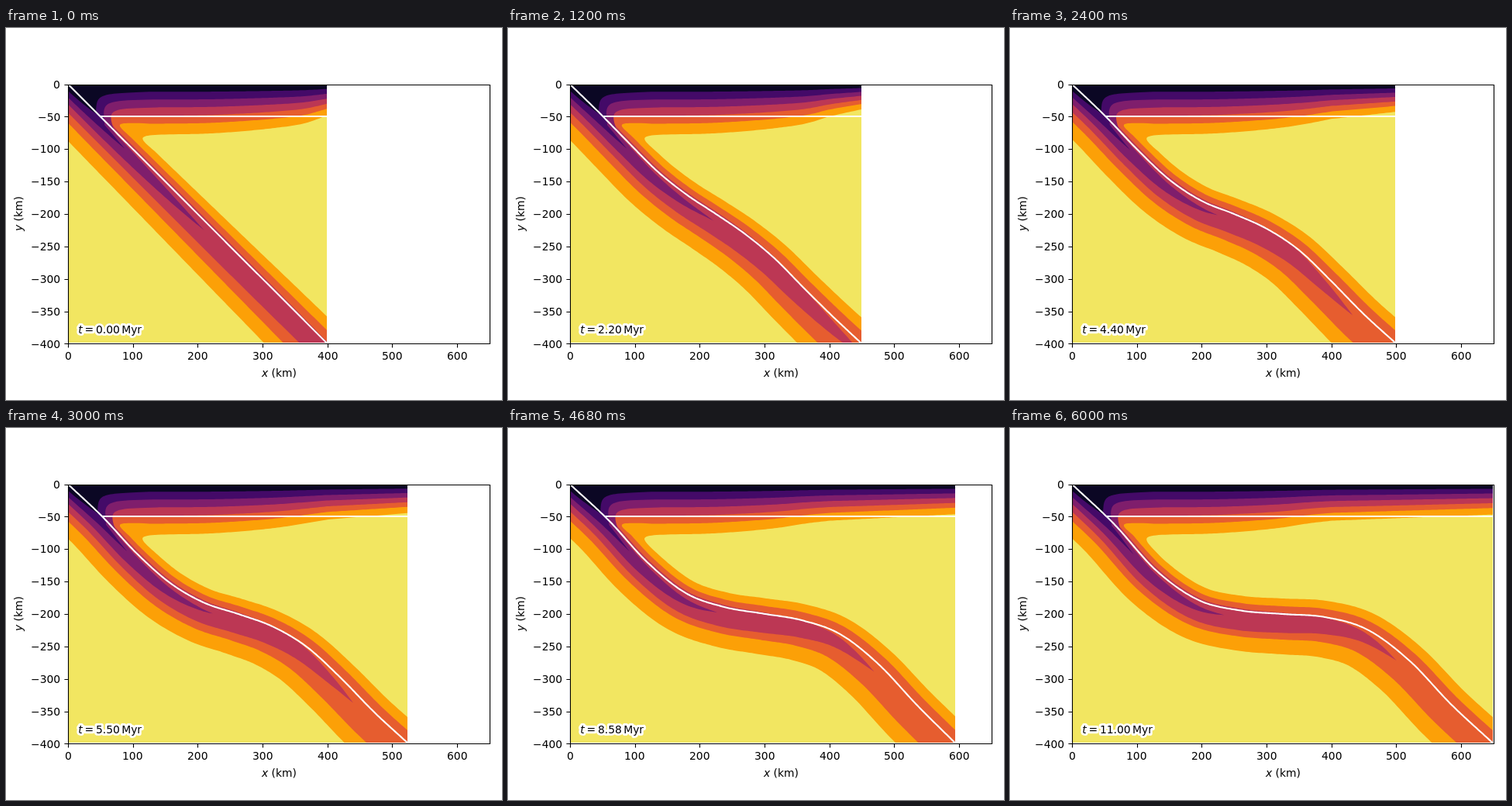
Write an HTML page with a canvas that moves like this. It is 640x480 px and loops after 6120 ms.

```html
<!DOCTYPE html>
<html lang="en">
<head>
<meta charset="utf-8">
<title>Slab temperature</title>
<style>
html, body { margin: 0; width: 100%; height: 100%; overflow: hidden; background: #fff; }
canvas { display: block; width: 640px; height: 480px; }
</style>
</head>
<body>
<canvas id="stage" width="640" height="480"></canvas>
<script>
const ctx = document.getElementById('stage').getContext('2d');
const LEFT = 80, TOP = 72.6, BOTTOM = 407.4, RIGHT = 624;
const SCALE = (RIGHT - LEFT) / 650;
const STEP_MS = 120, STEPS = 51, STEP_MYR = 0.22;
const FONT = '13.89px "DejaVu Sans", sans-serif';

// Poses of the slab: depth at tenths of the domain width, for each key time.
const KEY_TIMES = [0, 1.1, 3.3, 5.5, 7.04, 8.58, 11];
const TENTHS = [0, .1, .2, .3, .4, .5, .6, .7, .8, .9, 1];
const SLAB_Y = [
  [106, 139.6, 173, 206.5, 240, 273.5, 307, 340.4, 373.9],
  [107.5, 144, 179, 210, 240, 270, 303, 338.5, 373],
  [111, 151.5, 191, 220, 240, 262, 291, 331, 371],
  [114, 161, 200, 225.5, 240, 256, 282, 322, 367],
  [116, 167, 207, 228.5, 239.5, 251, 271, 312, 361],
  [119, 173, 213, 231, 239.5, 248, 266, 305, 358],
  [124, 184, 222, 235.5, 240, 244, 260, 300, 357]
].map(row => [TOP, ...row, BOTTOM]);

// Depth of the hottest plate isotherm.
const PLATE_X = [150, 250, 300, 350, 385, 414.8];
const PLATE_DEPTH = [65, 64, 61, 56, 50.5];
const DEPTH_OLD_EDGE = [40, 39.5, 43.5, 45.5, 46.5, 47, 47];
const DEPTH_NEW_EDGE = [40, 32, 34, 37, 38, 38.5, 39];

// Isotherms, hot to cold. below/above: normal distances from the slab surface,
// join: where the mantle corner leaves the slab, nose: its control point.
const LEVELS = [
  { color: '#fca007', ratio: 1, below: [51, 58, 53], above: [15, 25], join: 179, nose: [167, 138], plate: 230 },
  { color: '#e65d2f', ratio: .785, below: [35, 40, 31], above: [8, 12], join: 152, nose: [140, 122], plate: 185 },
  { color: '#bc3754', ratio: .625, below: [26], above: [3], join: 138, nose: [128, 113], plate: 180,
    tip: [600, 510, 453, 456, 467, 480, 506], tipDepth: 11, power: [5, 5] },
  { color: '#7f1e6c', ratio: .46, below: [18.4], above: [0], join: 142, nose: [130, 104], plate: 195,
    tip: [262, 267, 272, 270, 271, 272, 278], tipDepth: 9, power: [3, 1.5], drift: 1 },
  { color: '#440a68', ratio: .305, below: [12], above: [2], join: 130, nose: [124, 94], plate: 190,
    tip: [158, 158, 159, 161, 161, 162, 165], tipDepth: 7, power: [2, 1], drift: 1 },
  { color: '#0b0724', ratio: .15, below: [6], above: [0], join: 117, nose: [117, 85], plate: 185,
    tip: [118, 118, 119, 120, 121, 121, 122], tipDepth: 1, power: [2, 1], drift: 1 }
];

const clamp = (v, a, b) => Math.max(a, Math.min(b, v));
const lerp = (a, b, f) => a + (b - a) * f;

function spline(xs, ys, x) {
  const last = xs.length - 1;
  let i = 0;
  while (i < last - 1 && x > xs[i + 1]) i++;
  const slope = j => {
    const a = Math.max(j - 1, 0), b = Math.min(j + 1, last);
    return (ys[b] - ys[a]) / (xs[b] - xs[a]);
  };
  const h = xs[i + 1] - xs[i], f = (x - xs[i]) / h, g = 1 - f;
  return ys[i] * g * g * (1 + 2 * f) + ys[i + 1] * f * f * (3 - 2 * f)
    + h * f * g * (slope(i) * g - slope(i + 1) * f);
}

const atTime = (values, time) => spline(KEY_TIMES, values, time);

function makeScene(time) {
  const width = SCALE * (400 + 250 * time / 11);
  const edge = LEFT + width;
  const nodes = TENTHS.map((_, i) => atTime(SLAB_Y.map(row => row[i]), time));
  const slabY = x => {
    if (x < LEFT) return TOP + x - LEFT;
    if (x > edge) return BOTTOM + x - edge;
    return spline(TENTHS, nodes, (x - LEFT) / width);
  };
  const offset = (x, distance) => {
    const slope = (slabY(x + 2) - slabY(x - 2)) / 4, length = Math.hypot(1, slope);
    return [x - distance * slope / length, slabY(x) + distance / length];
  };
  const oldDepth = atTime(DEPTH_OLD_EDGE, time), newDepth = atTime(DEPTH_NEW_EDGE, time);
  const depths = [...PLATE_DEPTH, oldDepth];
  const oldEdge = PLATE_X[PLATE_X.length - 1];
  const plateDepth = x => x <= oldEdge
    ? spline(PLATE_X, depths, x)
    : lerp(oldDepth, newDepth, (x - oldEdge) / Math.max(edge - oldEdge, 1));
  return { time, width, edge, slabY, offset, plateDepth };
}

function fillLevel(level, scene) {
  const { time, width, edge, offset, plateDepth } = scene;
  const end = level.tip ? atTime(level.tip, time) : edge + 100;
  const progress = x => clamp((x - LEFT) / (level.tip ? end - LEFT : width), 0, 1);
  const below = x => {
    const f = progress(x), b = level.below;
    return level.tip
      ? lerp(b[0], level.tipDepth, f ** level.power[0])
      : lerp(b[0], lerp(b[1], b[2], time / 11), f);
  };
  const above = x => {
    const f = progress(x), a = level.above;
    return level.tip
      ? lerp(-a[0], level.tipDepth, f ** level.power[1])
      : -lerp(a[0], a[1], f);
  };
  const plateY = x => TOP + level.ratio * plateDepth(x);
  const drift = (level.drift || 0) * 4 * time / 11;
  const join = Math.min(level.join + drift, end);
  const noseX = level.nose[0] + drift, noseY = level.nose[1];

  ctx.beginPath();
  ctx.moveTo(0, TOP);
  for (let x = 10; x < end; x += 3) ctx.lineTo(...offset(x, below(x)));
  for (let x = end; x > join; x -= 3) ctx.lineTo(...offset(x, above(x)));
  ctx.lineTo(...offset(join, above(join)));
  ctx.bezierCurveTo(noseX, noseY, noseX, noseY, level.plate, plateY(level.plate));
  for (let x = level.plate + 3; x < edge; x += 3) ctx.lineTo(x, plateY(x));
  ctx.lineTo(edge, plateY(edge));
  ctx.lineTo(edge, TOP);
  ctx.closePath();
  ctx.fillStyle = level.color;
  ctx.fill();
}

function drawField(scene) {
  const { edge, slabY } = scene;
  ctx.save();
  ctx.beginPath();
  ctx.rect(LEFT, 73, Math.round(edge) - 1 - LEFT, 333);
  ctx.clip();
  ctx.fillStyle = '#f2e661';
  ctx.fillRect(LEFT, 73, edge - LEFT, 334);
  for (const level of LEVELS) fillLevel(level, scene);

  ctx.beginPath();
  ctx.moveTo(LEFT, TOP);
  for (let x = LEFT + 2; x < edge; x += 2) ctx.lineTo(x, slabY(x));
  ctx.lineTo(edge, BOTTOM);
  const plateBase = Math.round(TOP + 50 * SCALE);
  let corner = LEFT;
  while (slabY(corner) < plateBase) corner += .25;
  ctx.moveTo(corner, plateBase);
  ctx.lineTo(edge, plateBase);
  ctx.strokeStyle = '#fff';
  ctx.lineWidth = 2.08;
  ctx.stroke();
  ctx.restore();
}

// Draws [text, italic, gap before] runs from x; returns the total width.
function drawRuns(runs, x, y, paint) {
  let pen = x;
  for (const [text, italic, gap = 0] of runs) {
    ctx.font = (italic ? 'italic ' : '') + FONT;
    pen += gap;
    if (paint) paint(text, pen, y);
    pen += ctx.measureText(text).width;
  }
  return pen - x;
}

const fillText = (text, x, y) => ctx.fillText(text, x, y);
const strokeText = (text, x, y) => ctx.strokeText(text, x, y);

function drawAxisName(name) {
  const runs = [[name, true], [' (km)', false]];
  drawRuns(runs, Math.round(-drawRuns(runs, 0, 0) / 2), 0, fillText);
}

// Places a label on whole pixels; align is the share of its width left of x.
function drawLabel(text, x, y, align) {
  const left = x - align * ctx.measureText(text).width;
  ctx.fillText(text, Math.round(left), Math.round(y));
}

function drawAxes() {
  const snap = v => Math.round(v) + .5;
  ctx.strokeStyle = ctx.fillStyle = '#000';
  ctx.lineWidth = 1.11;
  ctx.font = FONT;
  ctx.beginPath();
  ctx.rect(snap(LEFT), snap(TOP), RIGHT - LEFT, snap(BOTTOM) - snap(TOP));
  for (let km = 0; km <= 600; km += 100) {
    const x = LEFT + km * SCALE;
    ctx.moveTo(snap(x), snap(BOTTOM));
    ctx.lineTo(snap(x), 412.4);
    drawLabel(String(km), x, 428, .5);
  }
  for (let km = 0; km <= 400; km += 50) {
    const y = TOP + km * SCALE;
    ctx.moveTo(75.4, snap(y));
    ctx.lineTo(80.5, snap(y));
    drawLabel(km ? '\u2212' + km : '0', 70.3, y + 5.2, 1);
  }
  ctx.stroke();

  ctx.save();
  ctx.translate(352, 450);
  drawAxisName('x');
  ctx.restore();
  ctx.save();
  ctx.translate(21, 240);
  ctx.rotate(-Math.PI / 2);
  drawAxisName('y');
  ctx.restore();
}

function drawClock(time) {
  const runs = [['t', true], ['=', false, 2.8], [time.toFixed(2), false, 2.8], ['Myr', false, 2.3]];
  ctx.strokeStyle = '#fff';
  ctx.lineWidth = 6;
  ctx.lineJoin = 'round';
  drawRuns(runs, 93.3, 394, strokeText);
  ctx.fillStyle = '#000';
  drawRuns(runs, 93.3, 394, fillText);
  ctx.lineJoin = 'miter';
}

function draw(time) {
  ctx.fillStyle = '#fff';
  ctx.fillRect(0, 0, 640, 480);
  drawField(makeScene(time));
  drawAxes();
  drawClock(time);
}

let shown = -1;
const start = performance.now();
function tick() {
  const step = Math.floor((performance.now() - start) / STEP_MS) % STEPS;
  if (step !== shown) draw(step * STEP_MYR);
  shown = step;
  requestAnimationFrame(tick);
}
tick();
</script>
</body>
</html>
```
